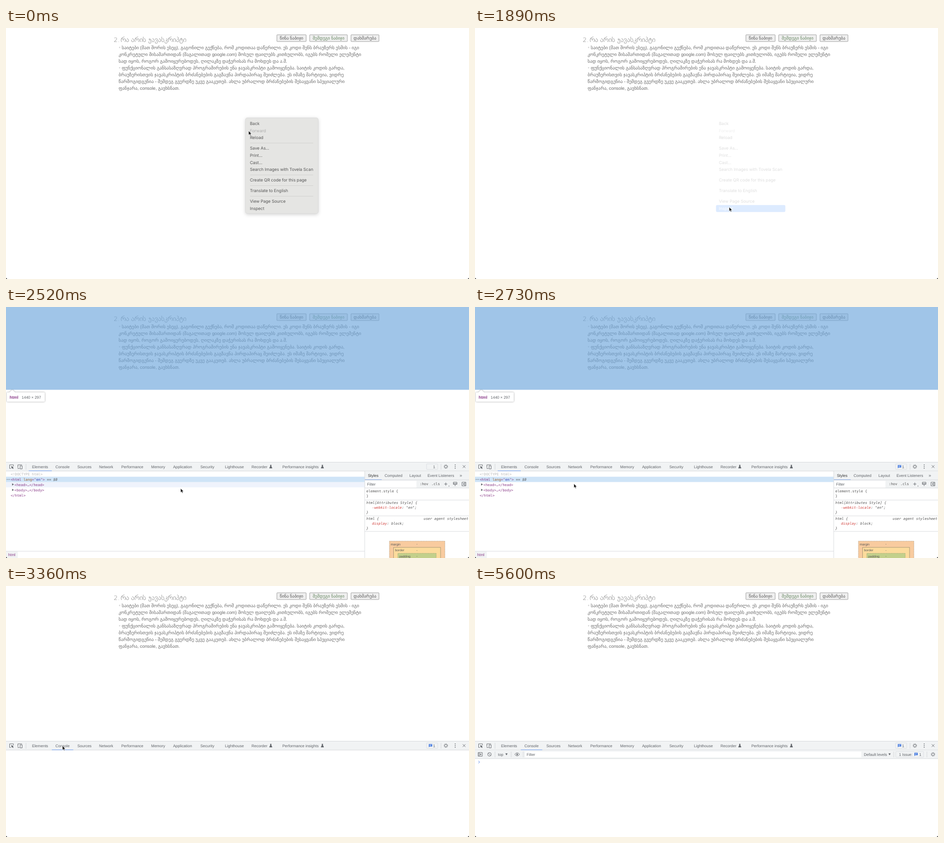
Recreate the animation shown at these times as an HTML page. Size 960x520 px, loop 5740 ms.

```html
<!DOCTYPE html>
<html lang="en">
<head>
<meta charset="utf-8">
<title>Opening the console</title>
<style>
html, body { margin: 0; width: 960px; height: 520px; overflow: hidden; background: #fff; }
svg { display: block; --geo: 8.6px; }
text { font: 8px "Liberation Sans", "DejaVu Sans", sans-serif; fill: #5f6368; text-rendering: geometricPrecision; white-space: pre; }
.line { font-size: var(--geo); fill: #6a6a6a; }
.latin { font-size: 9.33px; }
.title { font: 200 calc(var(--geo) * 1.5) "DejaVu Sans", sans-serif; fill: #777; }
.num { font-size: 12.5px; }
.btn { font-size: calc(var(--geo) * .95); fill: #555; text-anchor: middle; }
.next { fill: #64855f; }
.item { font: 8.67px Inter, sans-serif; letter-spacing: -.04px; fill: #555; }
.off { fill: #adadad; }
.item.on { fill: #fff; }
.code { font: 7.33px "DejaVu Sans Mono", monospace; fill: #555; }
.it { font-style: italic; }
.tag { fill: #8c3f8a; }
.attr { fill: #a0622f; }
.val { fill: #3a3ab0; }
.prop { fill: #d0403c; }
.dim { fill: #b8b8b8; }
.small { font-size: 6.6px; fill: #555; }
.dark { fill: #333; }
.bar { fill: #f1f3f4; }
.rule { stroke: #cbcdd1; stroke-width: .7; fill: none; }
.ico { stroke: #5f6368; stroke-width: .9; fill: none; }
.fill { fill: #5f6368; }
.blue { fill: #3b73dd; }
.tabline { fill: #84aaf0; }
.box { fill: #fff; stroke: #d0d3d8; stroke-width: .6; }
#panel { filter: drop-shadow(0 2px 3.5px rgba(0,0,0,.17)); }
#tip { filter: drop-shadow(0 .7px 1.5px rgba(0,0,0,.4)); }
</style>
</head>
<body>
<svg id="stage" width="960" height="520" viewBox="0 0 960 520"></svg>
<script>
const LOOP = 5740, STEP = 70;
const stage = document.getElementById('stage');

const text = (x, y, s, cls = '') => `<text x="${x}" y="${y}" class="${cls}">${s}</text>`;
const span = (cls, s) => `<tspan class="${cls}">${s}</tspan>`;
const rect = (x, y, x2, y2, attrs = '') =>
  `<rect x="${x}" y="${y}" width="${x2 - x}" height="${y2 - y}" ${attrs}/>`;
const path = (d, cls = 'ico') => `<path d="${d}" class="${cls}"/>`;
const rules = d => path(d, 'rule');
const group = (id, ...parts) => `<g id="${id}">${parts.join('')}</g>`;

// icons
const gear = (x, y) => `<circle cx="${x}" cy="${y}" r="2.6" class="ico" stroke-width="1.4"/>
  <circle cx="${x}" cy="${y}" r="3.9" class="ico" stroke-dasharray="1.55 1.51"/>`;
const flask = x => path(`M${x - 1.3} 327.5h2.6M${x - .7} 327.5v2.3l-2 4h5.4l-2-4v-2.3z`, 'ico fill');
const chat = (x, y) => path(`M${x} ${y}h7v5h-5.2l-1.8 1.8z`, 'blue') +
  `<path d="M${x + 1.3} ${y + 1.7}h4.4m-4.4 1.6h3" stroke="#fff" stroke-width=".7"/>`;
const down = (x, y) => path(`M${x} ${y}h4.6l-2.3 4z`, 'fill');

// web page
const lines = [
  'საიტები (მათ შორის ესეც), გაგონილი გექნება, რომ კოდითაა დაწერილი. ეს კოდი შენს ბრაუზერს ესმის - იგი',
  `კონკრეტული მისამართიდან (მაგალითად ${span('latin', 'google.com')}) მოსულ ფაილებს კითხულობს, იგებს რომელი ელემენტი`,
  'სად იყოს, როგორ გამოიყურებოდეს, ღილაკზე დაჭერისას რა მოხდეს და ა.შ.',
  'ფუნქციონალის განსასაზღვრად პროგრამირების ენა ჯავასკრიპტი გამოიყენება. საიტის კოდის გარდა,',
  'ბრაუზერისთვის ჯავასკრიპტის ბრძანებების გაგზავნა პირდაპირაც შეიძლება. ეს იმაზე მარტივია, ვიდრე',
  'წარმოგიდგენია - შემდეგ გვერდზე უკვე გააკეთებ. ახლა უბრალოდ ბრძანებების შესაყვანი სპეციალური',
  `ფანჯარა, ${span('latin', 'console')}, გავხსნათ.`
];
const button = (x, x2, s, cls = '') =>
  rect(x, 14, x2, 28, 'fill="#efefef" stroke="#8c8c8c" stroke-width=".8" rx=".8"') +
  text((x + x2) / 2, 24, s, 'btn ' + cls);
const bullet = y => `<circle cx="235.6" cy="${y}" r=".9" fill="none" stroke="#999" stroke-width=".5"/>`;
const page = group('page',
  text(223.5, 29, span('num', '2.'), 'title'),
  text(237.7, 29, 'რა არის ჯავასკრიპტი', 'title'),
  lines.map((s, i) => text(i % 3 || i > 5 ? 233.5 : 240, 44.2 + 14.03 * i, s, 'line')).join(''),
  bullet(40.3), bullet(82.4),
  button(561.7, 622.3, 'წინა ნაბიჯი'),
  button(629.7, 707.8, 'შემდეგი ნაბიჯი', 'next'),
  button(715.3, 773.3, 'დახმარება'));

// context menu
const items = [
  ['Back', 198], ['Forward', 212.7], ['Reload', 227.3], ['Save As...', 249.3], ['Print...', 264],
  ['Cast...', 278.7], ['Search Images with Tovela Scan', 293.3], ['Create QR code for this page', 315.3],
  ['Translate to English', 337.3], ['View Page Source', 359.3], ['Inspect', 374]
];
const menu = group('menu',
  group('panel',
    rect(496.3, 186, 647.5, 384.4, 'rx="4.5" fill="#e5e5e3" stroke="#d4d4d4" stroke-width=".6"'),
    '<path d="M506 238.3h131m-131 66.2h131m-131 22h131m-131 22h131" stroke="#cececc" stroke-width=".8"/>'),
  group('entries',
    rect(499.7, 0, 643.5, 14.4, 'id="hot" rx="2.6" fill="#569cff"'),
    items.map(([s, y], i) => text(505.7, y + 3.1, s, i == 1 ? 'item off' : 'item')).join('')));

// developer tools
const tabs = [['Elements', 54], ['Console', 102.5], ['Sources', 148], ['Network', 193], ['Performance', 239],
  ['Memory', 301], ['Application', 346.5], ['Security', 403], ['Lighthouse', 454], ['Recorder', 509],
  ['Performance insights', 573]];
const toolbar = group('toolbar',
  rect(0, 321.5, 960, 340, 'class="bar"'),
  rules('M0 321.5h960M0 339.9h960M41.5 325v12M902 325v12'),
  path('M10 334.5h-2.5v-7.5h8v2.6'),
  path('M10.8 329.8l5.3 2-2.2 .8 1.8 2-1 .8-1.7-2-1 1.8z', 'fill'),
  path('M24.6 333v-6h8.6M24 334.6h4'), path('M29.3 329h4.2v6.4h-4.2z'),
  tabs.map(([s, x]) => text(x, 333.6, s)).join(''), flask(549), flask(656),
  rect(872, 325, 895, 336.5, 'class="box" rx="1" style="fill:none"'),
  text(885.5, 333.6, '1'), group('badge', chat(876.7, 327.5)),
  gear(912, 330.7),
  [327.2, 330.7, 334.2].map(y => `<circle cx="931.4" cy="${y}" r=".9" class="fill"/>`).join(''),
  path('M947 327.8l5.6 5.6m0-5.6l-5.6 5.6'));

const code = (x, y, s, cls = '') => text(x, y, s, 'code ' + cls);
const elements = group('elements',
  rect(47, 338.8, 95, 340, 'class="tabline"'),
  rect(0, 340.5, 743.5, 351.5, 'id="row" fill="#eff3fc"'),
  rect(0, 351.6, 743.5, 362.6, 'fill="#cfe4f7"'),
  code(9.7, 349.2, '&lt;!DOCTYPE html&gt;', 'dim'),
  [2.2, 4.8, 7.4].map(x => `<circle cx="${x}" cy="357.3" r=".7" class="fill"/>`).join(''),
  code(9.7, 360, span('tag', '&lt;html ') + span('attr', 'lang') + span('tag', '="') + span('val', 'en') +
    span('tag', '"&gt;') + span('it', ' == $0')),
  path('M12.7 365.2l3.6 2.4-3.6 2.4zM12.7 376.5l3.6 2.4-3.6 2.4z', 'fill'),
  code(17.5, 370.9, '&lt;head&gt;…&lt;/head&gt;', 'tag'),
  code(17.5, 382.1, '&lt;body&gt;…&lt;/body&gt;', 'tag'),
  code(9.7, 393.3, '&lt;/html&gt;', 'tag'),
  rect(0, 506.3, 24.5, 520, 'class="bar"'),
  text(4.5, 516.3, 'html', 'tag'),
  rect(744, 340.2, 960, 375, 'class="bar"'),
  rect(744.5, 360, 851, 374.5, 'fill="#fff"'),
  rect(744, 357, 779, 358.2, 'class="tabline"'),
  rules('M0 506h743.5M743.8 340v180M744 358.2h216M744 375h216M744 400h216M744 432.8h216M744 465h216'),
  text(750.5, 351.8, 'Styles', 'dark'), text(785, 351.8, 'Computed'), text(836.5, 351.8, 'Layout'),
  text(874, 351.8, 'Event Listeners'), text(940.5, 351.8, '»', 'latin'),
  text(748.7, 369.7, 'Filter'),
  code(858, 369.3, ':hov'), code(882, 369.3, '.cls'),
  path('M908.7 366.8h6.4m-3.2-3.2v6.4M918.5 370v2'),
  path('M927.5 363h7.5v4.5h-7.5zM931.2 367.5v3.5M927.5 365.6h7.5'),
  path('M945.5 363h8v7.5h-8zM951.3 363v7.5'), path('M949.8 364.8v4l-2.6-2z', 'fill'),
  code(747, 383.9, 'element.style {'), code(747, 394.3, '}'),
  code(747, 407.8, 'html[Attributes Style] {', 'it'),
  code(759, 418, span('prop', '-webkit-locale') + ': "en";', 'it'), code(747, 427.9, '}', 'it'),
  code(747, 440.9, 'html {', 'it'), code(866, 440.9, 'user agent stylesheet', 'it'),
  code(759, 451.3, span('prop', 'display') + ': block;', 'it'), code(747, 461, '}', 'it'),
  rect(795, 485, 910, 530, 'fill="#f8cb9f" stroke="#a08a70" stroke-width=".7" stroke-dasharray="2 1.3"'),
  rect(803.7, 498, 901, 530, 'fill="#fcdb9c" stroke="#8a8068" stroke-width=".7"'),
  rect(812.5, 510.3, 892, 530, 'fill="#c3d08b" stroke="#8c9a6a" stroke-width=".7" stroke-dasharray="2 1.3"'),
  text(797.8, 493.6, 'margin', 'small'), text(851, 493.2, '-', 'small'),
  text(806.7, 506.1, 'border', 'small'), text(851, 505.7, '-', 'small'),
  text(815.3, 518.7, 'padding', 'small'), text(851, 518.3, '-', 'small'));

const consolePane = group('console',
  rect(95, 338.8, 139.5, 340, 'class="tabline"'),
  group('filters',
    rect(0, 340.2, 960, 357.6, 'class="bar"'),
    rect(104, 343, 801, 355, 'fill="#fff"'),
    rules('M0 357.7h960M41.5 343v12M75 343v12M100 343v12M868.3 343v12M937 343v12'),
    path('M6.5 345h8.6v7.6h-8.6zM8.6 345v7.6'), path('M10.5 346.7v4.2l3-2.1z', 'fill'),
    '<circle cx="30" cy="348.8" r="3.7" class="ico"/>', path('M27.4 346.2l5.2 5.2'),
    text(47.7, 351.8, 'top'), down(63, 346.8),
    path('M82.4 348.8q5-6.4 10 0q-5 6.4-10 0z'), '<circle cx="87.4" cy="348.8" r="1.6" class="fill"/>',
    text(107, 351.8, 'Filter'),
    text(806.3, 351.8, 'Default levels'), down(857.3, 346.8),
    rect(872.5, 343, 930, 354.8, 'class="box" rx="1" style="fill:none"'),
    text(879, 351.8, '1 Issue:'), chat(911, 345.6), text(921, 351.8, '1'),
    gear(949.6, 348.8)),
  group('prompt', '<path d="M7 362.4l2.8 2.4-2.8 2.4" fill="none" stroke="#5b8bea" stroke-width="1"/>'),
  group('caret', rect(15.8, 360.3, 16.5, 369, 'fill="#777"')));

const overlay = group('overlay',
  rect(0, 0, 960, 171.5, 'fill="#6fa8dc" fill-opacity=".66"'),
  group('tip', '<path d="M3.5 176.8h3.5l6-5.3 6 5.3h59.5q2 0 2 2v15.5q0 2-2 2h-75q-2 0-2-2v-15.5q0-2 2-2z" fill="#fff"/>'),
  '<text x="7.5" y="189.6" class="tag" style="font-weight:bold;font-size:8.6px">html</text>',
  text(32.5, 189.6, '1440 × 297'));

stage.innerHTML = page + overlay +
  group('tools', rect(0, 321, 960, 520, 'fill="#fff"'), toolbar, elements, consolePane) +
  menu +
  '<path d="M0 517q.3 2.7 3 3h-3zM960 517q-.3 2.7-3 3h3z" fill="#000"/>' +
  '<path id="cursor" d="M0 0v8.7l2-1.8 1.5 3.2 1.5-.7-1.4-3h2.7z" fill="#111" stroke="#fff" stroke-width=".7"/>';

const $ = id => document.getElementById(id);
const show = (id, on) => { $(id).style.display = on ? '' : 'none'; };

// one type size for the Georgian copy, so the block fills its column whichever face is used
const copy = [...document.querySelectorAll('.line')];
const total = copy.reduce((sum, el) => sum + el.getComputedTextLength(), 0);
stage.style.setProperty('--geo', 8.6 * 2878 / total + 'px');

// cursor tip: time, x, y
const moves = [
  [0, 503, 213], [70, 503, 217], [280, 506, 280], [490, 516, 346], [630, 522.5, 369.5], [840, 527, 371],
  [2310, 527, 371], [2380, 505, 372], [2520, 362, 375.7], [2730, 205, 366], [2870, 122, 348], [2940, 110, 340],
  [3220, 117, 331], [4060, 117, 331], [4130, 159.3, 289.7], [4690, 515, -4]
];
function cursorAt(t) {
  const i = moves.findIndex(m => m[0] > t);
  if (i < 0) return moves[moves.length - 1].slice(1);
  const [a, b] = [moves[i - 1], moves[i]];
  const k = (t - a[0]) / (b[0] - a[0]);
  return [1, 2].map(n => a[n] + (b[n] - a[n]) * k);
}

const within = (t, a, b) => t >= a && t < b;
const fade = (t, from, span) => Math.min(1, Math.max(0, 1 - (t - from) / span));
const labels = [...document.querySelectorAll('.item')];

function draw(t) {
  const [x, y] = cursorAt(t);
  $('cursor').setAttribute('transform', `translate(${x} ${y})`);
  show('cursor', t < 4760);

  // the panel fades a little ahead of its entries
  show('menu', t < 1960);
  $('panel').style.opacity = fade(t, 1680, 210);
  $('entries').style.opacity = fade(t, 1680, 260);
  const blink = within(t, 1610, 1680);
  const hot = blink ? -1 : items.findIndex(([, c], i) => i != 1 && Math.abs(y - c) < 7.3);
  show('hot', hot >= 0);
  if (hot >= 0) $('hot').setAttribute('y', items[hot][1] - 7.2);
  labels.forEach((el, i) => el.classList.toggle('on', i == hot));

  show('tools', t >= 2310);
  show('elements', within(t, 2380, 3360));
  show('overlay', within(t, 2450, 2940));
  show('badge', t >= 2660);
  show('row', within(t, 2450, 2660) || within(t, 2940, 3010));
  $('row').setAttribute('y', t < 2660 ? 362.6 : 340.5);

  show('console', t >= 3360);
  show('filters', t >= 3430);
  show('prompt', t >= 3570);
  show('caret', within(t, 3570, 3710) || within(t, 4130, 4620) || within(t, 4900, 5600));
}

const start = performance.now();
function tick() {
  const t = (performance.now() - start) % LOOP;
  draw(Math.floor(t / STEP) * STEP);
  requestAnimationFrame(tick);
}
tick();
</script>
</body>
</html>
```
